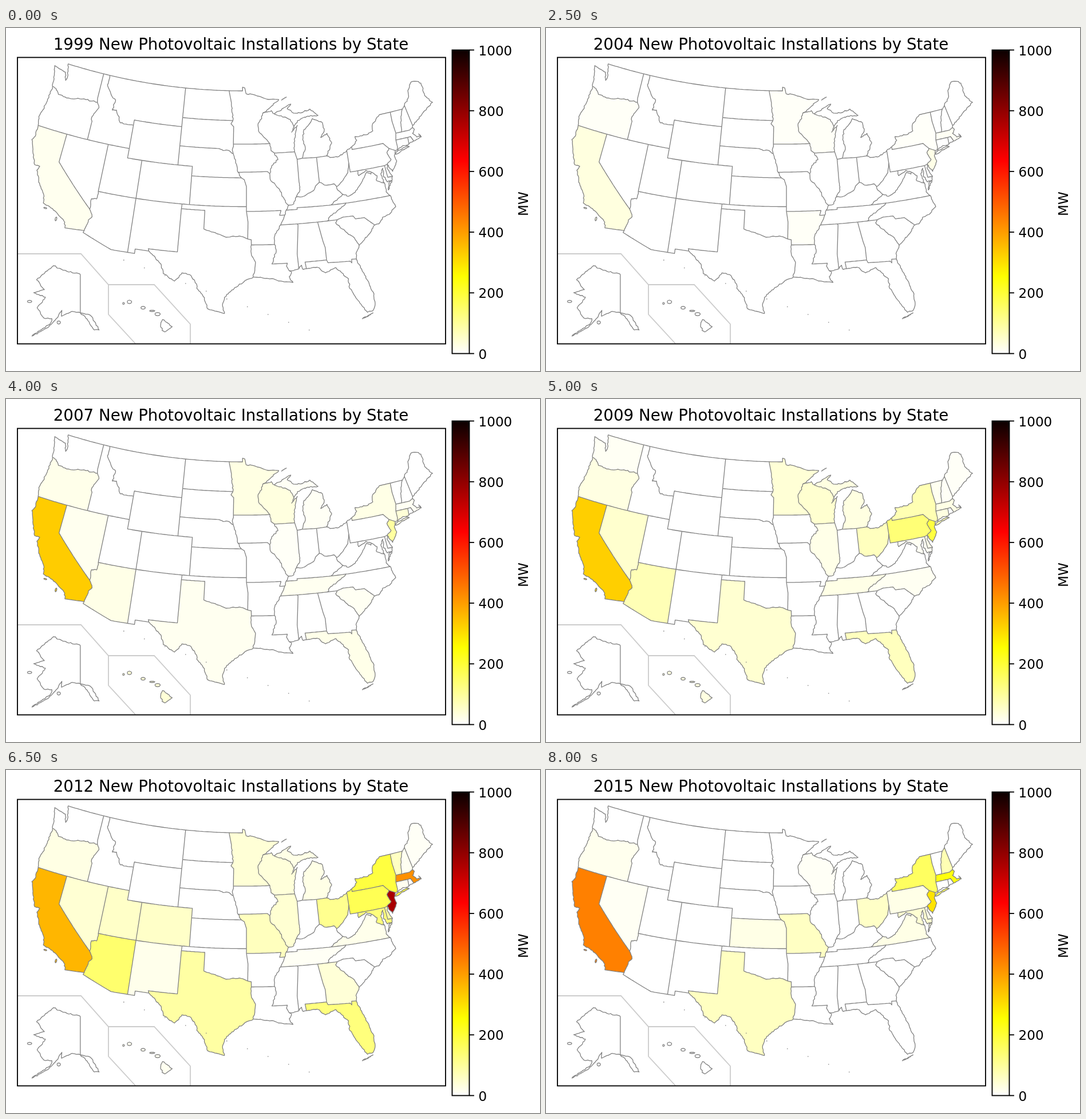
An HTML page that plays this animation: 933 px wide and 600 px high, repeating every 8.5 s.

```html
<!DOCTYPE html>
<html lang="en">
<head>
<meta charset="utf-8">
<title>New Photovoltaic Installations by State</title>
<style>
html, body { margin: 0; width: 100%; height: 100%; overflow: hidden; background: #fff; }
svg { display: block; width: 100%; height: 100%; font-family: "DejaVu Sans", sans-serif; font-size: 23.1px; }
#title { font-size: 27.7px; }
#borders { fill: none; stroke: #808080; stroke-width: 1.3; stroke-linejoin: round; }
#inset { fill: none; stroke: #ccc; stroke-width: 1.8; }
.axis { stroke: #000; stroke-width: 1.85; }
</style>
</head>
<body>
<svg viewBox="0 0 933 600">
  <defs>
    <linearGradient id="hot" x1="0" y1="1" x2="0" y2="0">
      <stop offset="0" stop-color="#fff"/>
      <stop offset=".254" stop-color="#ff0"/>
      <stop offset=".635" stop-color="#f00"/>
      <stop offset="1" stop-color="#0b0000"/>
    </linearGradient>
  </defs>
  <path id="inset" d="M20 395H131L179 449H259L322 518V552M179 449V501L226 552"/>
  <g id="states"></g>
  <g id="borders"></g>
  <rect class="axis" x="20" y="51.5" width="748" height="501" fill="none"/>
  <rect class="axis" x="779.5" y="38.5" width="30" height="531" fill="url(#hot)"/>
  <g id="ticks"></g>
  <text transform="translate(911.5 307.5) rotate(-90)" text-anchor="middle">MW</text>
  <text id="title" x="393" y="38" text-anchor="middle"></text>
</svg>
<script>
// Borders in degrees west, degrees north. "~" is a river or coast, "@" an island's centre and radii.
const BORDERS = `
WAc~ 124,46.3 124.1,46.9 124.7,48.4 122.8,48.1 122.4,47.3 122.3,47.9 122.8,49
WAN 122.8,49 117.03,49
IDN 117.03,49 116.05,49
MTN 116.05,49 104.05,49
NDN 104.05,49 97.23,49
MNN 97.23,49 95.15,49 95.15,49.38 94.8,49.3 94.6,48.7
MNc~ 94.6,48.7 93.4,48.6 91.4,48.1 89.6,48 91,47.2 92.1,46.7
WAOR~ 124,46.3 123.4,46.2 122.8,45.7 121.2,45.65 119,46 116.92,46
WAID 117.03,49 117.04,46.4 116.92,46
ORc~ 124,46.3 124.1,44.5 124.5,42.9 124.2,42
ORCA 124.2,42 120,42
ORNV 120,42 117.03,42
ORID~ 116.92,46 116.5,45.5 117.2,44.4 117.03,43.8
IDOR 117.03,43.8 117.03,42
IDNV 117.03,42 114.04,42
IDUT 114.04,42 111.05,42
IDWY 111.05,42 111.05,44.47
IDMT~ 116.05,49 116.05,48 114.8,46.8 114.35,46.65 114.5,45.56 113.9,45.65 113,44.45 111.05,44.47
MTWY 111.05,44.47 111.05,45 104.05,45
WYUT 111.05,42 111.05,41 109.05,41
WYCO 109.05,41 104.05,41
WYNE 104.05,41 104.05,43
WYSD 104.05,43 104.05,45
MTSD 104.05,45 104.05,45.94
MTND 104.05,45.94 104.05,49
NDSD 104.05,45.94 96.56,45.94
NDMN~ 97.23,49 96.85,47.6 96.56,45.94
SDMN 96.56,45.94 96.85,45.6 96.45,45.3 96.45,43.5
SDIA~ 96.45,43.5 96.6,42.9 96.45,42.5
SDNE 104.05,43 98.5,43
NESD~ 98.5,43 97.9,42.8 97.2,42.85 96.45,42.5
NECO 104.05,41 102.05,41 102.05,40
NEKS 102.05,40 95.3,40
NEMO~ 95.77,40.58 95.3,40
NEIA~ 96.45,42.5 96.1,41.7 95.77,40.58
UTNV 114.04,42 114.04,37
UTAZ 114.04,37 109.05,37
UTCO 109.05,41 109.05,37
CONM 109.05,37 103,37
COOK 103,37 102.05,37
COKS 102.05,37 102.05,40
NVAZ~ 114.04,37 114.04,36.2 114.7,36.1 114.63,35
NVCA 120,42 120,39 114.63,35
CAAZ~ 114.63,35 114.14,34.3 114.5,33.9 114.72,32.72
CAMX 114.72,32.72 117.12,32.53
CAc~ 117.12,32.53 117.3,33.1 118.4,33.75 119.2,34.15 120.5,34.45 120.65,35.15 121.9,36.6 122.5,37.5 122.3,38 123,38 123.8,39.3 124.4,40.4 124.1,41 124.2,42
CA1@ 120.1,34 .2,.06
CA2@ 118.45,33.2 .1,.2
AZMX 114.72,32.72 114.81,32.5 111.07,31.33 109.05,31.33
AZNM 109.05,37 109.05,31.33
NMMX 109.05,31.33 108.2,31.33 108.2,31.78 106.53,31.78
NMTX 106.53,31.78 106.62,32 103.06,32 103.04,36.5
NMOK 103.04,36.5 103,37
OKTX 103.04,36.5 100,36.5 100,34.56
RED~ 100,34.56 98.1,34.1 97.2,33.8 95.5,33.95 94.48,33.64
OKAR 94.48,33.64 94.43,35.4 94.62,36.5
OKMO 94.62,36.5 94.62,37
OKKS 94.62,37 102.05,37
KSMO 95.3,40 94.9,39.8 94.61,39.1 94.62,37
TXAR 94.48,33.64 94.04,33.55 94.04,33.02
TXLA~ 94.04,33.02 94.04,32 93.55,31.2 93.85,29.7
TXc~ 93.85,29.7 94.7,29.4 96.4,28.35 97.2,27.6 97.4,26.9 97.15,25.95
TXMX~ 97.15,25.95 99.1,26.4 99.5,27.5 100.3,28.3 100.7,29.1 101.4,29.77 102.3,29.88 103.1,28.98 104.5,29.65 104.9,30.6 106.53,31.78
ARLA 94.04,33.02 91.17,33
ARMS~ 91.17,33 91.1,33.9 90.3,35
ARTN~ 90.3,35 89.7,36
ARMO 94.62,36.5 90.15,36.5 90.37,36 89.7,36
TNMO~ 89.7,36 89.5,36.5
KYMO~ 89.5,36.5 89.15,37
LAMS~ 91.17,33 91,32.3 91.6,31
MSLA 91.6,31 89.73,31 89.85,30.7 89.55,30.2
MSTN 90.3,35 88.2,35
MSAL 88.2,35 88.1,34.9 88.47,31.9 88.4,30.35
MSc~ 89.55,30.2 88.4,30.35
LAc~ 93.85,29.7 92.3,29.55 91.3,29.4 90.2,29.1 89.2,29 89.6,29.6 89.3,30 89.55,30.2
TNAL 88.2,35 85.6,35
TNGA 85.6,35 84.32,35
GAAL 85.6,35 85.18,32.9 85,32.3 85,31
ALFL 85,31 87.6,31 87.5,30.3
ALc~ 88.4,30.35 88.05,30.7 87.9,30.25 87.5,30.3
GAFL 85,31 84.86,30.7 82.2,30.57 82.05,30.37 82,30.75 81.45,30.7
FLc~ 81.45,30.7 80.55,28.4 80.05,26.9 80.15,25.7 80.5,25.2 81.1,25.15 81.8,26.2 82.7,27.8 82.7,28.8 84,30.1 85.3,29.7 86.2,30.35 87.5,30.3
FL1~ 81.8,24.55 80.5,25 81.8,24.55
GAc~ 81.45,30.7 81.3,31.4 80.87,32.05
GASC~ 80.87,32.05 81.4,33 82.2,33.6 83.35,34.7 83.1,35
GANC 84.32,35 83.1,35
SCNC 83.1,35 82.3,35.2 81.04,35.15 80.8,34.82 79.67,34.8 78.55,33.86
SCc~ 78.55,33.86 79.2,33.2 80.87,32.05
NCTN~ 84.32,35 84,35.4 82.9,35.95 81.68,36.59
NCVA 81.68,36.59 75.87,36.55
TNVA 81.68,36.59 83.68,36.6
KYTN 89.5,36.5 88.06,36.5 88.06,36.68 83.68,36.6
NCc~ 75.87,36.55 75.5,35.3 76.5,34.65 77.4,34.5 78,33.9 78.55,33.86
KYVA~ 83.68,36.6 81.97,37.54
KYWV~ 81.97,37.54 82.6,38.2 82.6,38.42
WVVA~ 81.97,37.54 81.2,37.25 80.3,37.55 79.3,38.4 78.35,39.4 77.83,39.13 77.72,39.32
WVMD~ 79.48,39.72 79.48,39.2 78.4,39.6 77.72,39.32
MDVA~ 77.72,39.32 77.05,38.85 77.25,38.35 76.3,37.95
VAc~ 76.3,37.95 76.3,37 75.87,36.55
VA1~ 75.25,38.03 75.97,37.15 75.65,37.95 75.25,38.03
KYOH~ 84.82,39.1 84.2,38.75 82.9,38.75 82.6,38.42
WVOH~ 82.6,38.42 82.2,38.6 80.85,39.7 80.52,40.64
PAOH 80.52,41.98 80.52,40.64
PAWV 80.52,40.64 80.52,39.72 79.48,39.72
PAMD 79.48,39.72 75.79,39.72
PADE 75.79,39.72 75.42,39.8
MDDE 75.79,39.72 75.7,38.46 75.05,38.45
DEc~ 75.42,39.8 75.5,39.3 75.05,38.45
MDc~ 75.05,38.45 75.25,38.03 75.9,38 76.2,38.8 76.1,39.5 76.5,39 76.3,37.95
PAc~ 80.52,41.98 79.76,42.27
PANY 79.76,42.27 79.76,42 75.35,42 74.7,41.36
PANJ~ 74.7,41.36 75.1,41 74.75,40.2 75.42,39.8
NYNJ 74.7,41.36 73.9,41
NJc~ 73.9,41 74.2,40.5 74.05,39.9 74.9,38.95 75.42,39.8
NYc~ 79.76,42.27 78.9,42.85 79.05,43.27 77.5,43.25 76.4,43.5 76.3,44.1 75,45
NYN 75,45 73.34,45
NYVT 73.34,45 73.4,44 73.27,42.75
NYMA 73.27,42.75 73.5,42.05
NYCT 73.5,42.05 73.5,41.3 73.66,41
NYs 73.66,41 73.9,41
NY1~ 74,40.6 73.7,40.87 72.3,41.15 71.9,41.05 74,40.6
VTN 73.34,45 71.5,45
VTNH~ 71.5,45 72.05,44.1 72.46,42.73
VTMA 73.27,42.75 72.46,42.73
NHN 71.5,45 71.08,45.3
NHME 71.08,45.3 70.7,43.07
NHc 70.7,43.07 70.82,42.87
NHMA 72.46,42.73 71.3,42.7 70.82,42.87
MEc~ 71.08,45.3 70.25,45.95 70,46.7 69.2,47.45 68.3,47.35 67.8,47.05 67.8,45.7 67,44.8 68.5,44.2 70.7,43.07
MACT 73.5,42.05 71.8,42.02
MARI 71.8,42.02 71.38,42.02 71.12,41.5
CTRI 71.8,42.02 71.86,41.32
CTc~ 71.86,41.32 72.9,41.25 73.66,41
RIc~ 71.86,41.32 71.12,41.5
MAc~ 70.82,42.87 70.6,42.65 71,42.3 70.55,41.8 70,41.8 70.2,42.07 69.95,41.7 71.12,41.5
OHMI 84.82,41.7 83.45,41.73
OHc~ 83.45,41.73 82.7,41.5 81.7,41.5 80.52,41.98
OHIN 84.82,41.7 84.82,39.1
INKY~ 88.05,37.8 87.1,37.8 85.7,38.3 85.4,38.73 84.82,39.1
INIL 87.53,41.7 87.53,39.35
ILIN~ 87.53,39.35 87.5,38.5 88.05,37.8
INc 87.53,41.7 86.8,41.76
INMI 86.8,41.76 84.82,41.7
MIc~ 86.8,41.76 86.25,42.7 86.5,43.7 86.2,44.7 85.5,45.1 84.8,45.75 83.4,45.2 83.3,44.3 83.9,43.7 82.95,44.05 82.45,43 83.45,41.73
WIIL 90.64,42.5 87.8,42.5
ILc 87.8,42.5 87.53,41.7
IAIL~ 90.64,42.5 90.2,41.8 91.1,41.2 91.42,40.38
MOIL~ 91.42,40.38 91.4,39.8 90.2,38.7 89.5,37.3 89.15,37
ILKY~ 88.05,37.8 88.45,37.1 89.15,37
IAMO 95.77,40.58 91.73,40.61 91.42,40.38
IAMN 96.45,43.5 91.22,43.5
IAWI~ 91.22,43.5 91.1,42.75 90.64,42.5
MNWI~ 92.1,46.7 92.3,46.1 92.85,45.6 92.75,44.75 91.22,43.5
WIs~ 92.1,46.7 90.8,46.9 90.4,46.55
WIMI~ 90.4,46.55 88.1,45.9 87.6,45.1
WIc~ 87.6,45.1 88,44.55 87.1,45.2 87.7,43.8 87.8,42.5
UPc~ 87.6,45.1 87,45.7 85.5,46.05 83.9,46 85,46.75 86.5,46.45 87.5,46.5 88.4,47 87.8,47.45 90.4,46.55
MI1~ 89.2,47.9 88.4,48.2 89.2,47.9
AKE 141,69.65 141,60.3
AKc~ 141,69.65 151,70.45 156.6,71.3 166.3,68.5 161.8,66.3 168,65.6 161.2,64.5 166,61.7 162,58.7 157.5,58.6 158,57.4 169,52.9 160,55.7 154,59 151.7,61 151.9,59.3 146,60.7 141,60.3
AKs~ 141,60.3 137,58.4 133,55 130.1,55 133.8,58.8 135.5,59.7 141,60.3
AK1@ 170.4,63.4 1.3,.3
AK2@ 153.5,57.4 1,.5
HI1@ 159.5,22.05 .25,.18
HI2@ 160.15,21.9 .1,.1
HI3@ 158,21.45 .25,.15
HI4@ 157,21.13 .3,.07
HI5@ 156.4,20.8 .3,.17
HI6~ 155.85,20.25 154.8,19.5 155.6,18.95 155.9,19.1 156.05,19.75 155.85,20.25`;

// Rings of each state, then rises and falls: peak MW, its year, years up, years down.
const STATES = `
CAc ORCA NVCA CAAZ CAMX/CA1/CA2: 32 2004 10 9, 330 2007 3.3 30, 408 2010 5 18, 444 2015 6 9
WAOR ORID IDOR ORNV ORCA ORc: 33 2010 8 10
WAc WAN WAID WAOR: 22 2010 2 2
ORNV IDNV UTNV NVAZ NVCA: 65 2010 4 6
UTAZ AZNM AZMX CAAZ NVAZ: 170 2013 7 2
IDUT WYUT UTCO UTAZ UTNV: 55 2012 1.5 2
WYCO NECO COKS COOK CONM UTCO: 55 2012 1.5 1
CONM NMOK NMTX NMMX AZNM: 20 2012 1.5 3
OKTX RED TXAR TXLA TXc TXMX NMTX: 92 2012 6 9
NEKS KSMO OKKS COKS: 25 2015 1 1
NDSD SDMN SDIA NESD SDNE WYSD MTSD: 10 2013 1 1
MNN MNc MNWI IAMN SDMN NDMN: 55 2011 8 4
WIs WIMI WIc WIIL IAWI MNWI: 55 2010 7 6
MIc OHMI INMI/UPc WIMI/MI1: 50 2011 5 2
WIIL ILc INIL ILIN ILKY MOIL IAIL: 45 2012 6 1
INc INMI OHIN INKY ILIN INIL: 130 2013 1 2
OHMI OHc PAOH WVOH KYOH OHIN: 130 2011 4 7
PAc PANY PANJ PADE PAMD PAWV PAOH: 205 2010 3 3.5, 170 2012 3 1.5, 24 2015 3 9
NYc NYN NYVT NYMA NYCT NYs NYNJ PANY/NY1: 25 2007 4 9, 190 2012 5 18
NYNJ NJc PANJ: 95 2007 4 9, 765 2012 4 2, 380 2013 2 9
VTMA NHMA MAc MARI MACT NYMA: 15 2005 4 9, 420 2012 3.2 7
MACT CTRI CTc NYCT: 40 2007 3 8
VTN VTNH VTMA NYVT: 60 2012 4 1
NHN NHME NHc NHMA VTNH: 18 2010 2 9, 75 2015 2.5 1
MEc NHME: 15 2010 2 5
PAMD MDDE MDc MDVA WVMD: 130 2012 3.3 4.6
PADE DEc MDDE: 110 2013 5 2.5
WVVA MDVA VAc NCVA TNVA KYVA/VA1: 20 2012 2 1, 25 2015 2 1
NCVA NCc SCNC GANC NCTN: 25 2010 2 2
SCNC SCc GASC: 12 2007 2 2
TNGA GANC GASC GAc GAFL GAAL: 40 2012 2 2
GAFL FLc ALFL/FL1: 130 2012 6 2.6
TNMO ARTN MSTN TNAL TNGA NCTN TNVA KYTN: 30 2010 6 3
IAMO MOIL KYMO TNMO ARMO OKMO KSMO NEMO: 90 2013 3.5 6
ARMO ARTN ARMS ARLA TXAR OKAR: 8 2004 2 2
HI1/HI2/HI3/HI4/HI5/HI6: 40 2007 3 8`;

const RAD = Math.PI / 180;
const byId = id => document.getElementById(id);
const lines = text => text.trim().split("\n");
const same = (a, b) => a[0] === b[0] && a[1] === b[1];
const toPath = pts => "M" + pts.map(p => p.map(n => +n.toFixed(1))).join("L");

let seed = 7;
const random = () => (seed = seed * 16807 % 2147483647) / 2147483647;

// Lambert conformal conic for the main map, Mercator for the insets.
const mercator = lat => Math.log(Math.tan((45 + lat / 2) * RAD));
function lambert([lon, lat]) {
  const n = .6305, rho = 1.95496 * Math.exp(-n * mercator(lat)), a = n * (95 - lon) * RAD;
  return [415 + 968 * rho * Math.sin(a), 110 + 968 * (rho * Math.cos(a) - 1.05136)];
}
const inset = (scale, x, y) => ([lon, lat]) =>
  [x + scale * 15.88 * (190 - lon), y - scale * 909.6 * (mercator(lat) - mercator(20))];
const insets = { AK: inset(.19, -18, 666), HI: inset(1, -268.7, 514) };

function island([[lon, lat], [rx, ry]]) {
  const pts = Array.from({ length: 8 }, (_, i) =>
    [lon + rx * Math.cos(i * 45 * RAD), lat + ry * Math.sin(i * 45 * RAD)]);
  return [...pts, pts[0]];
}

// Projects a line in short steps, pushing the inner points aside if it is ragged.
function trace(pts, project, ragged) {
  const out = [project(pts[0])];
  for (let i = 1; i < pts.length; i++) {
    const [lon, lat] = pts[i - 1], [lon2, lat2] = pts[i];
    const a = project(pts[i - 1]), b = project(pts[i]);
    const n = Math.ceil(Math.hypot(b[0] - a[0], b[1] - a[1]) / 3.5);
    for (let k = 1; k < n; k++) {
      const t = k / n, p = project([lon + (lon2 - lon) * t, lat + (lat2 - lat) * t]);
      out.push(ragged ? p.map(v => v + (random() - .5) * 2) : p);
    }
    out.push(b);
  }
  return out;
}

const arcs = {};
for (const line of lines(BORDERS)) {
  const [label, ...words] = line.split(" ");
  const [, name, kind] = label.match(/(\w+)(\W?)/);
  const pts = words.map(w => w.split(",").map(Number));
  arcs[name] = trace(kind === "@" ? island(pts) : pts, insets[name.slice(0, 2)] || lambert, kind);
}

// Joins arcs end to end, turning them round where needed.
function ring(names) {
  const [first, ...rest] = names.split(" ").map(n => arcs[n]);
  let pts = first.slice();
  if (rest.length && ![rest[0][0], rest[0].at(-1)].some(p => same(p, pts.at(-1)))) pts.reverse();
  for (const part of rest) {
    pts = pts.concat(same(part[0], pts.at(-1)) ? part : part.slice().reverse());
  }
  return toPath(pts) + "Z";
}

const states = lines(STATES).map(line => {
  const [rings, waves] = line.split(": ");
  return {
    d: rings.split("/").map(ring).join(""),
    waves: waves.split(", ").map(w => w.split(" ").map(Number)),
  };
});
byId("states").innerHTML = states.map(s => `<path d="${s.d}"/>`).join("");
const shapes = [...byId("states").children];

const specks = Array.from({ length: 10 }, (_, i) => `<path d="M${205 + 36 * i} ${406 + 13.6 * i}h1.5"/>`);
byId("borders").innerHTML =
  Object.values(arcs).map(a => `<path d="${toPath(a)}"/>`).join("") + specks.join("");

byId("ticks").innerHTML = [0, 200, 400, 600, 800, 1000].map(v => {
  const y = 569.5 - v * .531;
  return `<path class="axis" d="M810 ${y}h8"/><text x="825.5" y="${y + 9}">${v}</text>`;
}).join("");

const output = (waves, year) => Math.max(0, ...waves.map(([mw, peak, up, down]) =>
  mw * (1 - (year < peak ? (peak - year) / up : (year - peak) / down))));

function heat(mw) {
  const h = 1 - mw / 1000;
  const part = v => Math.round(255 * Math.min(1, Math.max(0, v)));
  return `rgb(${part(.0416 + h * 2.625)},${part((h - .365) / .381)},${part((h - .746) / .254)})`;
}

let shown;
function draw() {
  const year = 1999 + Math.floor(performance.now() % 8500 / 500);
  if (year !== shown) {
    shown = year;
    byId("title").textContent = `${year} New Photovoltaic Installations by State`;
    states.forEach((s, i) => shapes[i].setAttribute("fill", heat(output(s.waves, year))));
  }
  requestAnimationFrame(draw);
}
draw();
</script>
</body>
</html>
```
